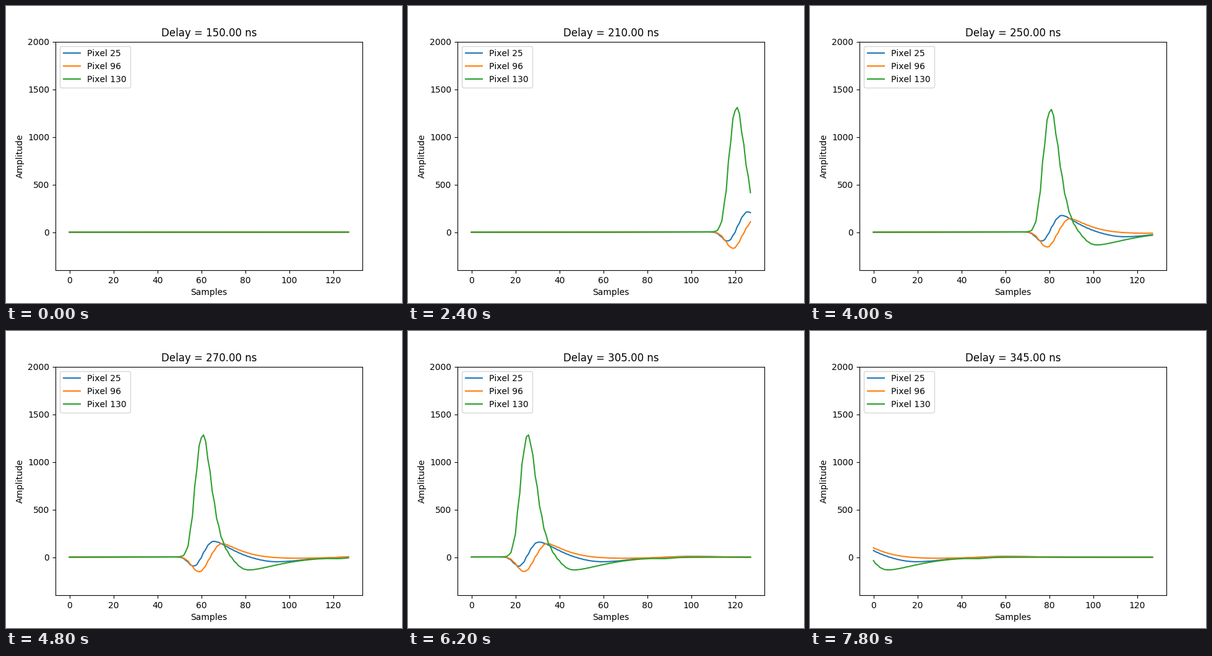
Recreate the animation shown at these times as a matplotlib script. Size 640x480 px, loop 8 s.

```python
import numpy as np
import matplotlib.pyplot as plt
from matplotlib.animation import FuncAnimation

plt.rcParams["text.kerning_factor"] = 6   # classic letter spacing

FRAMES, INTERVAL = 40, 200
START, STEP = 150, 5          # delay in ns: first value, step per frame
PEAK = 331                    # sample of the main peak = PEAK - delay
JITTER = 0.13                 # odd samples are read late, even ones early

samples = np.arange(128)
parity = np.where(samples % 2, JITTER, -JITTER)


def bump(u, centre, height, left, right, p_left=2, p_right=2):
    """Bell with its own width and steepness on each side."""
    d = u - centre
    rise = (np.abs(d) / left) ** p_left
    fall = (np.abs(d) / right) ** p_right
    return height * np.exp(-np.where(d < 0, rise, fall))


def blue(u, fade):
    return (bump(u, -4.2, -102, 3.6, 3.8)
            + bump(u, 4.5, 154, 5.1, 11.2, 2, 1.8)
            + bump(u, 5, 37 * fade, 4, 4)
            + bump(u, 33, -48, 12, 17)
            + bump(u, 72, 9, 8, 20))


def orange(u, fade):
    return (bump(u, -1.8, -150, 4.7, 4.4, 2.2)
            + bump(u, -1.8, -13 * fade, 3, 3)
            + bump(u, 8.5, 146, 5, 11, 2, 1.4)
            + bump(u, 40, -12, 20, 18)
            + bump(u, 72, 7, 8, 20))


def green(u, fade):
    return (bump(u, 0, 1280 + 20 * fade, 4.95, 5.6, 2.4, 1.55)
            + bump(u, 21, -134, 7.6, 19.5, 2.6, 1.5)
            + bump(u, 62, -8, 5, 4))


def signal(shape, delay):
    u = samples - (PEAK - delay) + parity
    fade = np.exp((230 - delay) / 40)     # early pulses are slightly stronger
    return shape(u, fade) + bump(u, -11, 3.5, 40, 3)


pulses = {"Pixel 25": blue, "Pixel 96": orange, "Pixel 130": green}

fig, ax = plt.subplots(figsize=(6.4, 4.8), dpi=100)
lines = [ax.plot(samples, signal(shape, START), label=name)[0]
         for name, shape in pulses.items()]
ax.set_xlim(-6.35, 133.35)
ax.set_ylim(-400, 2000)
ax.set_xlabel("Samples")
ax.set_ylabel("Amplitude")
ax.legend(loc="upper left")
title = ax.set_title("")


def update(i):
    delay = START + STEP * i
    title.set_text(f"Delay = {delay:.2f} ns")
    for line, shape in zip(lines, pulses.values()):
        line.set_ydata(signal(shape, delay))
    return [title, *lines]


anim = FuncAnimation(fig, update, frames=FRAMES, interval=INTERVAL, repeat=True, repeat_delay=0)
plt.show()
```
